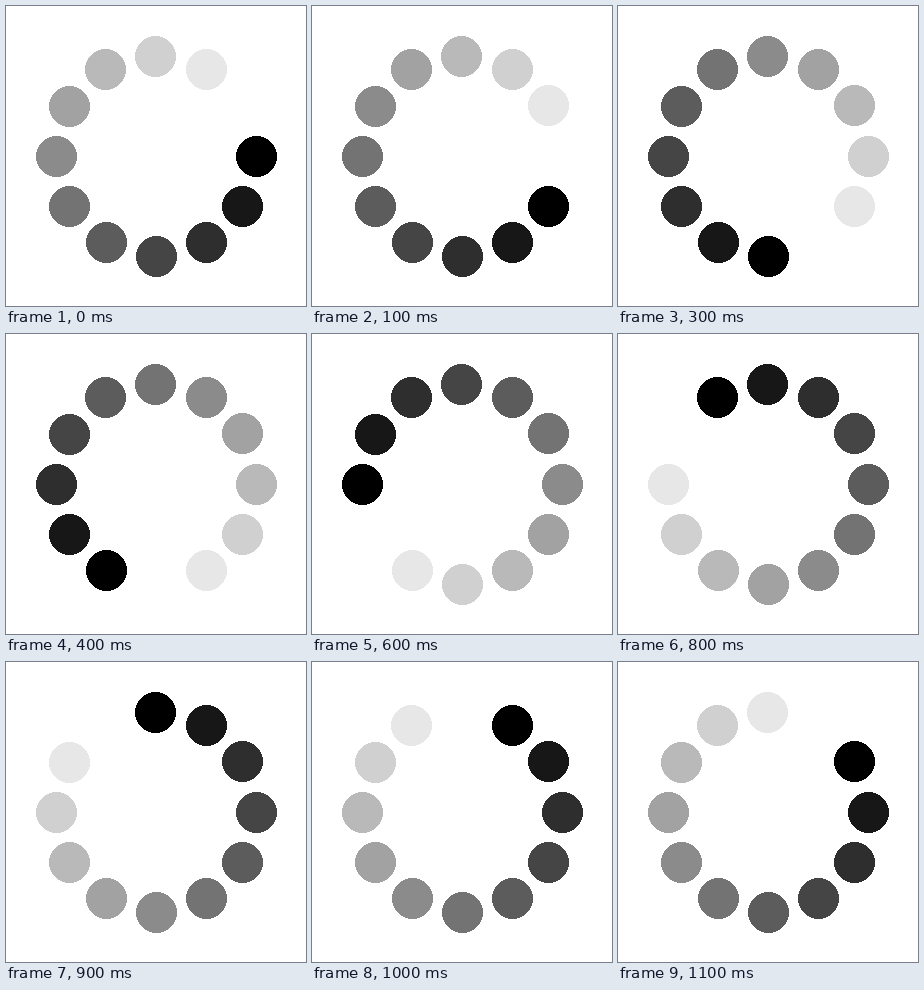
An HTML page that plays this animation: 300 px wide and 300 px high, repeating every 1200 ms.

```html
<!DOCTYPE html>
<html lang="en">
<head>
<meta charset="utf-8">
<title>Ring spinner</title>
<style>
  html, body { margin: 0; width: 100%; height: 100%; overflow: hidden; background: #fff; }
  svg { display: block; width: 300px; height: 300px; }
</style>
</head>
<body>
<svg id="ring" viewBox="0 0 300 300" shape-rendering="crispEdges"></svg>
<script>
const COUNT = 12;
const STEP = 100;
const CENTER = 150;
const RADIUS = 100;
const ring = document.getElementById('ring');

// Centre of a whole pixel on the ring
const onPixel = unit => Math.floor(CENTER + RADIUS * unit) + 0.5;

// The black head moves one dot per step; dots ahead of it fade to white
function shade(dot, step) {
  const ahead = (dot - step + COUNT) % COUNT;
  const v = Math.floor(255 * ahead / (COUNT - 1));
  return `rgb(${v}, ${v}, ${v})`;
}

function addDot(i) {
  const angle = i * 2 * Math.PI / COUNT;
  const dot = document.createElementNS('http://www.w3.org/2000/svg', 'circle');
  dot.setAttribute('cx', onPixel(Math.cos(angle)));
  dot.setAttribute('cy', onPixel(Math.sin(angle)));
  dot.setAttribute('r', 20.5);
  dot.setAttribute('fill', shade(i, 0));
  ring.append(dot);

  const frames = Array.from({ length: COUNT + 1 }, (_, s) => ({
    offset: s / COUNT,
    fill: shade(i, s % COUNT),
    easing: 'steps(1, end)'
  }));
  const spin = dot.animate(frames, { duration: STEP * COUNT, iterations: Infinity });
  spin.startTime = document.timeline.currentTime;
}

for (let i = 0; i < COUNT; i++) addDot(i);
</script>
</body>
</html>
```
